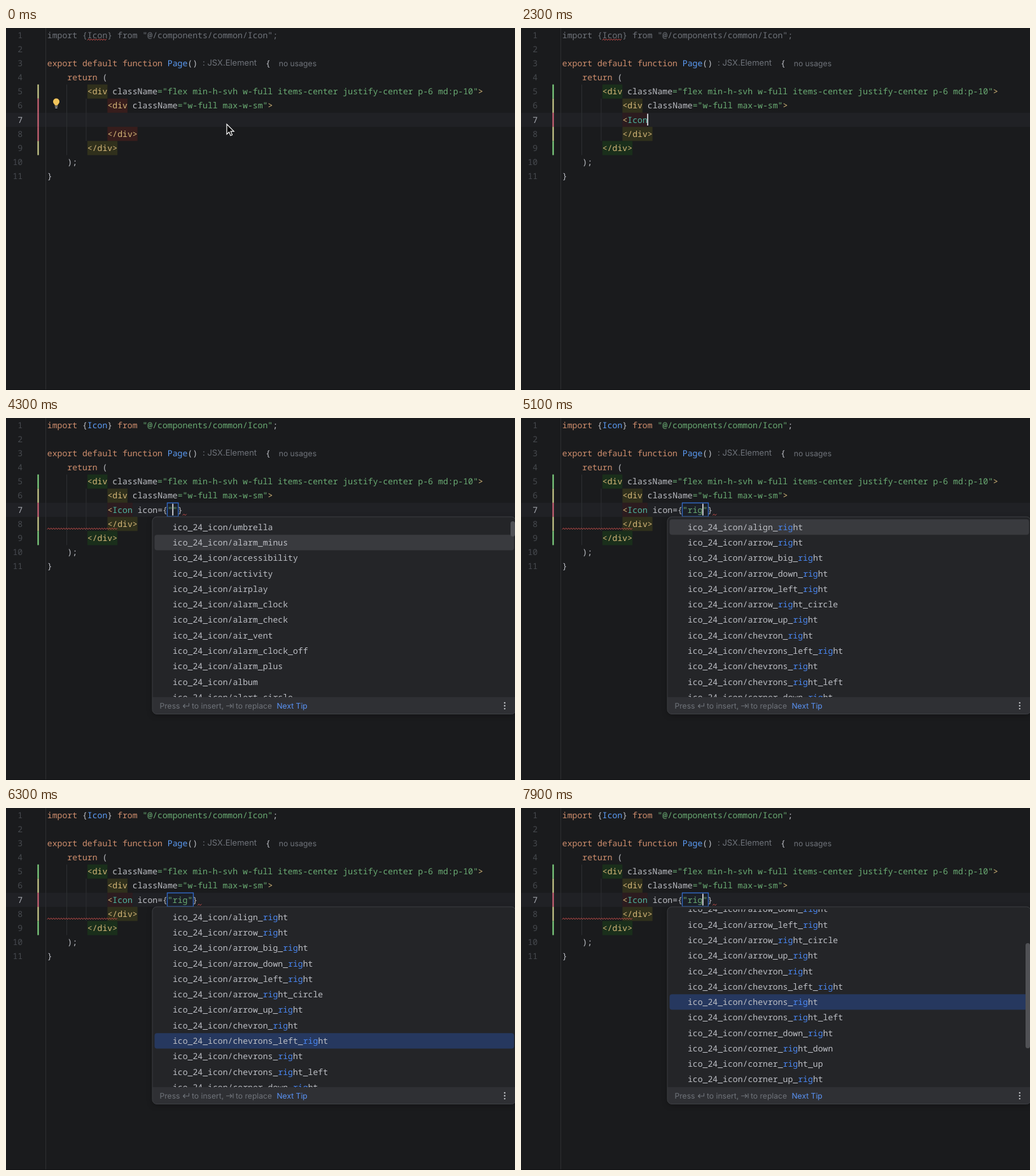
These frames come from a looping animation (800 px wide and 568 px high, 8 s). An HTML page:

```html
<!DOCTYPE html>
<html lang="en">
<head>
<meta charset="utf-8">
<title>Code completion</title>
<style>
  html, body { margin: 0; width: 100%; height: 100%; overflow: hidden; background: #1a1b1d; }
  svg { display: block; }
  text { white-space: pre; text-rendering: geometricPrecision; font: 500 13.14px "Noto Sans Mono", "DejaVu Sans Mono", monospace; }
  .ui { font-family: Inter, "Open Sans", sans-serif; font-weight: 400; }
  .shadow { filter: drop-shadow(0 2px 4px rgba(0, 0, 0, .3)); }
</style>
</head>
<body>
<svg id="stage" width="800" height="568" viewBox="0 0 800 568"></svg>
<script>
const LOOP = 8000, CH = 7.884, LINE = 22.17, LEFT = 64.8;
const ROW = 24.28, LIST_TOP = 159, LIST_H = 279, LIST_END = LIST_TOP + LIST_H;

const INK = {
  kw: '#cf8e6d', fn: '#5c9cf5', tx: '#bcbec4', st: '#6aab73', tg: '#d5b778',
  cp: '#4fb3a0', un: '#6f737a', hi: '#4a86f0', no: '#46494e', on: '#a6a9b0'
};
const MARK = { red: '#d9697d', yellow: '#d8d994', green: '#87e087' };
const TINT = { red: '#371d1c', yellow: '#30301c', green: '#1a2f1b', dim: '#2c1c1f' };

// Keystrokes on line 7: time, text before the caret, text after it.
const KEYS = [
  [-700, '', ''], [1500, '<', ''], [2200, '<Icon', ''], [2500, '<Icon ', ''],
  [2600, '<Icon i', ''], [2700, '<Icon ic', ''], [2800, '<Icon ico', ''],
  [2900, '<Icon icon', ''], [3000, '<Icon icon={', '}'], [3200, '<Icon icon={"', '"}'],
  [4500, '<Icon icon={"r', '"}'], [4600, '<Icon icon={"ri', '"}'], [4800, '<Icon icon={"rig', '"}']
];
// Selected row at turning points, one row per 100 ms between them.
const PICKS = [[5500, 0], [5800, 3], [6700, 12], [6900, 10], [7300, 14], [7800, 9], [8000, 9]];

const TAGS = 'webview div Page Icon i abbr a address animate animateMotion animateTransform area'.split(' ');
const NOTES = { Page: 'default, src/app/(auth)/Page.tsx', Icon: '(src/components/common/Icon.tsx)' };
const icons = names => names.split(' ').map(n => 'ico_24_icon/' + n);
const ALL = icons('umbrella alarm_minus accessibility activity airplay alarm_clock alarm_check air_vent alarm_clock_off alarm_plus album alert_circle');
const RIGHT = icons('align_right arrow_right arrow_big_right arrow_down_right arrow_left_right arrow_right_circle arrow_up_right chevron_right chevrons_left_right chevrons_right chevrons_right_left corner_down_right corner_right_down corner_right_up corner_up_right');

const esc = s => s.replace(/&/g, '&amp;').replace(/</g, '&lt;').replace(/>/g, '&gt;');
const mid = n => 11 + (n - 1) * LINE;
const lineTop = n => mid(n) - LINE / 2;
const col = n => LEFT + n * CH;

const rect = (x, y, w, h, fill, more = '') =>
  `<rect x="${x}" y="${y}" width="${w}" height="${h}" fill="${fill}" ${more}/>`;
const line = (d, color, width = 1) =>
  `<path d="${d}" fill="none" stroke="${color}" stroke-width="${width}"/>`;
const ui = (x, y, size, color, s) =>
  `<text class="ui" x="${x}" y="${y}" style="font-size:${size}px" fill="${color}">${esc(s)}</text>`;

// Runs look like 'kw return |tx (': ink code, blank, text.
function runs(x, y, src, more = '') {
  const spans = src.split('|').map(r => `<tspan fill="${INK[r.slice(0, 2)]}">${esc(r.slice(3))}</tspan>`);
  return `<text x="${x}" y="${y}" ${more}>${spans.join('')}</text>`;
}
const code = (n, c, src) => runs(col(c), mid(n) + 4.5, src);
const tint = (n, c, len, hue) => rect(col(c), lineTop(n), len * CH, LINE, TINT[hue]);

function squiggle(x, y, w) {
  let d = `M${x} ${y + 1.1}`;
  for (let i = 1; i * 2 <= w; i++) d += `L${x + i * 2} ${y + (i % 2 ? -1.1 : 1.1)}`;
  return line(d, '#d9534f', .9);
}

function gutter(hues) {
  let s = '';
  for (let n = 1; n <= 11; n++)
    s += runs(26.2, mid(n) + 4.5, (n === 7 ? 'on ' : 'no ') + n, 'text-anchor="end"');
  hues.forEach((h, i) => s += rect(49.5, lineTop(5 + i), 2, LINE, MARK[h]));
  return s;
}

function editor(t, before, after) {
  const open = t >= 2200, used = t >= 2400;
  const [outer, inner] = open ? ['green', 'yellow'] : ['yellow', 'red'];
  let s = rect(0, 0, 800, 568, '#1a1b1d') + rect(0, lineTop(7), 800, LINE, '#202125') +
    rect(0, 567, 800, 1, '#101113') + line('M62.5 0V567', '#2d2e31') +
    line(`M95.5 ${lineTop(5)}V${lineTop(10)}M126 ${lineTop(6)}V${lineTop(9)}`, '#2d2f32') +
    gutter([outer, inner, 'red', inner, outer]) +
    tint(5, 8, 4, outer) + tint(6, 12, 4, inner) + tint(8, 12, 6, inner) + tint(9, 8, 6, outer);
  if (open) s += tint(7, 12, 5, 'dim');

  s += code(1, 0, used
    ? 'kw import |tx {|fn Icon|tx } |kw from |st "@/components/common/Icon"|tx ;'
    : 'un import {Icon} from "@/components/common/Icon";');
  if (!used) s += squiggle(col(8), 18.2, 4 * CH);
  s += code(3, 0, 'kw export default function |fn Page|tx ()') +
    ui(309, 58.7, 13, '#6f737a', ': JSX.Element') + runs(408, mid(3) + 4.5, 'tx {') +
    ui(428.7, 59.8, 12.2, '#6f737a', 'no usages') +
    code(4, 4, 'kw return |tx (') +
    code(5, 8, 'tg <div |tx className|st ="flex min-h-svh w-full items-center justify-center p-6 md:p-10"|tg >') +
    code(6, 12, 'tg <div |tx className|st ="w-full max-w-sm"|tg >') +
    code(8, 12, 'tg </div>') + code(9, 8, 'tg </div>') + code(10, 4, 'tx );') + code(11, 0, 'tx }');

  const typed = before + after, end = col(12 + typed.length);
  if (typed.includes('"'))
    s += rect(253.5, 133.2, end - CH - 252.5, 21.3, '#1c2028', 'stroke="#3168c4" stroke-width="1.4"');
  if (typed) {
    const src = typed.replace(/^<(Icon)?/, (_, name) => 'tg <' + (name ? '|cp Icon|tx ' : ''))
      .replace(/"\w*"/, q => '|st ' + q + '|tx ');
    s += code(7, 12, src);
  }
  if (used) {
    if (typed.endsWith('}')) s += squiggle(end, 151.8, CH);
    s += squiggle(LEFT, 173.7, 14 * CH);
  }
  return s;
}

const bulb = () =>
  '<path d="M76.8 121.5C76.8 119.5 74 118.8 74 115.6A5 5 0 0 1 84 115.6C84 118.8 81.2 119.5 81.2 121.5Z" fill="#f2c55c"/>' +
  line('M76.8 123H81.2M77.4 125.3H80.6', '#c9c9c9', 1.2);

const pointer = () =>
  '<path d="M347 151V166.6L350.6 163.2L353 168.8L355.6 167.7L353.2 162.2H358.2Z" fill="#000" stroke="#fff" stroke-width="1.2"/>';

function tagIcon(name, y) {
  return NOTES[name]
    ? `<circle cx="154.7" cy="${y}" r="6.5" fill="#58a6ea"/>`
    : line(`M153 ${y - 4.8}L148.4 ${y}L153 ${y + 4.8}M156.6 ${y - 4.8}L161.2 ${y}L156.6 ${y + 4.8}`, '#a9acb2', 1.2);
}

function popup(p) {
  const { x, textX, items, pick, active, scroll = 0, thumb, query = '', icon, tip } = p;
  const right = x + 571.5;
  let rows = rect(x + 3.5, pick * ROW - scroll, 565, ROW, active ? '#26385f' : '#393a3e', 'rx="4"');
  items.forEach((name, i) => {
    const y = (i + .5) * ROW - scroll + .1;
    const at = query ? name.indexOf('_' + query, 12) + 1 : 0;
    const src = at ? `tx ${name.slice(0, at)}|hi ${query}|tx ${name.slice(at + query.length)}` : 'tx ' + name;
    rows += runs(textX, y + 4.5, src);
    if (icon) rows += icon(name, y);
    if (icon && NOTES[name]) rows += runs(689, y + 4.5, 'un ' + NOTES[name], 'text-anchor="end"');
  });
  let s = rect(x, 155, 571.5, 309.5, '#2f3034', 'rx="7" class="shadow"') +
    `<path d="M${x} ${LIST_END}V162q0-7 7-7H${right - 7}q7 0 7 7V${LIST_END}Z" fill="#242528"/>` +
    `<svg y="${LIST_TOP}" width="800" height="${LIST_H}">${rows}</svg>`;
  if (thumb) s += rect(right - 8.5, thumb[0], 7, thumb[1], '#505155', 'rx="3.5"');
  s += rect(x, 155, 571.5, 309.5, 'none', 'rx="7" stroke="#3d3f43"') + tip;
  for (const dy of [-4.6, 0, 4.6]) s += `<circle cx="${right - 17.7}" cy="${451.5 + dy}" r="1.2" fill="#c5c7cc"/>`;
  return s;
}

const tip = (x, s) => ui(x, 455.7, 12.1, '#6f737a', s);
const nextTip = x => ui(x, 455.7, 12.1, '#5a93f5', 'Next Tip');
const dotTip = tip(146.5, 'Press ^. to choose the selected (or first) suggestion and insert a dot afterwards') + nextTip(609.5);
const enterTip = tip(241.5, 'Press') + tip(292, 'to insert,') + tip(361, 'to replace') + nextTip(425.5) +
  line('M287.5 447.5V452H278.5M281.5 449L278.5 452L281.5 455M346 451.8H355M352 448.8L355 451.8L352 454.8M357 448V455.6', '#6f737a', 1.1);

function pickAt(t) {
  if (t <= PICKS[0][0]) return 0;
  const i = PICKS.findIndex(p => p[0] > t);
  const [t0, a] = PICKS[i - 1], [t1, b] = PICKS[i];
  return Math.round(a + (b - a) * (t - t0) / (t1 - t0));
}

function tagPopup(t) {
  const pick = t < 1900 ? 1 : t < 2000 ? 2 : 3;
  return popup({ x: 135, textX: 167, items: TAGS, pick, active: pick > 1, thumb: [166, 24], icon: tagIcon, tip: dotTip });
}

function iconPopup(t, query) {
  const base = { x: 230, textX: 262, tip: enterTip };
  if (!query) return popup({ ...base, items: ALL, pick: 1, thumb: [162, 24] });
  let lowest = 0;
  for (let u = 5500; u <= t; u += 100) lowest = Math.max(lowest, pickAt(u));
  const scroll = Math.max(0, (lowest + 1) * ROW - LIST_H);
  return popup({
    ...base, items: RIGHT, pick: pickAt(t), active: t >= 5600, scroll, query,
    thumb: scroll && [161 + scroll * .6, 165]
  });
}

function view(t) {
  const [since, before, after] = KEYS.filter(k => k[0] <= t).pop();
  let s = editor(t, before, after);
  if (t < 1500) s += bulb();
  if (Math.floor((t - since) / 500) % 2 === 0)
    s += rect(col(12 + before.length) - .6, 134.5, 1.8, 18.5, '#d6d8dc');
  if (t < 1500) s += pointer();
  if (t >= 1600 && t < 2200) s += tagPopup(t);
  if (t >= 3700) s += iconPopup(t, before.split('"')[1]);
  return s;
}

const stage = document.getElementById('stage');
const start = performance.now();
let shown = -1;
function tick() {
  const t = Math.floor((performance.now() - start) % LOOP / 100) * 100;
  if (t !== shown) stage.innerHTML = view(shown = t);
  requestAnimationFrame(tick);
}
tick();
</script>
</body>
</html>
```
